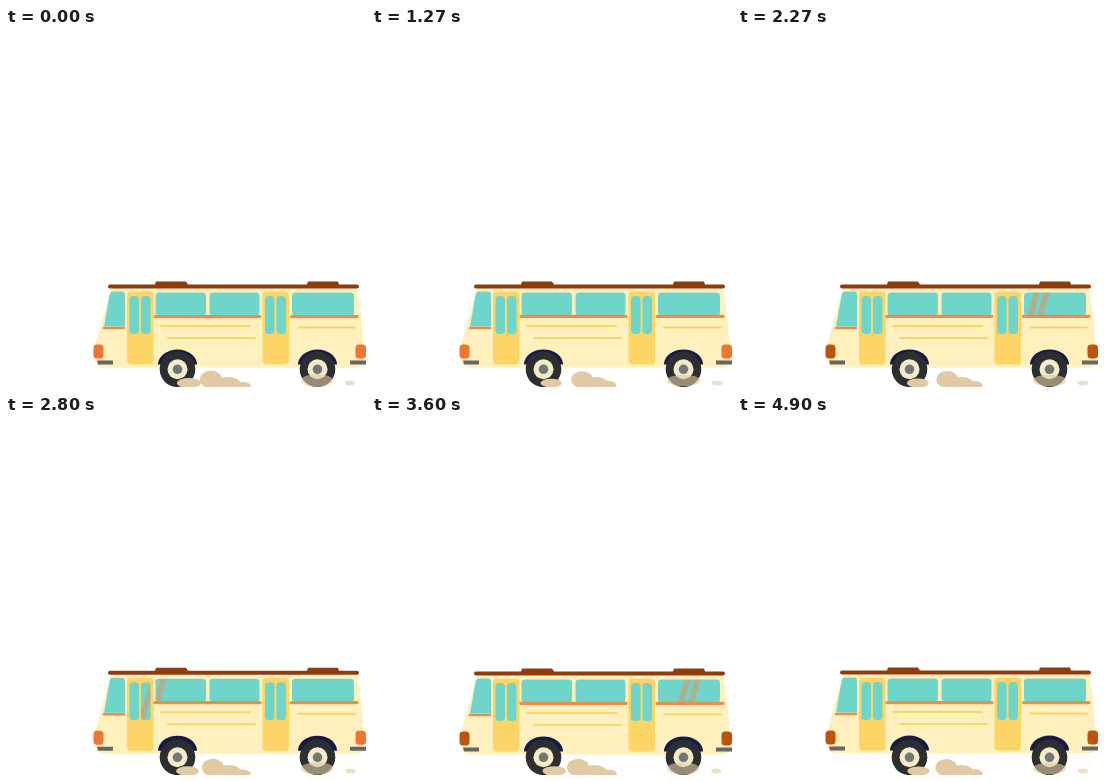
Write an HTML page that moves like this. It is 360x360 px and loops after 5000 ms.

```html
<!DOCTYPE html>
<html lang="en">
<head>
<meta charset="utf-8">
<title>Bus</title>
<style>
  html, body { margin: 0; width: 100%; height: 100%; overflow: hidden; background: #fff; }
  svg { display: block; width: 100vw; height: 100vh; }
</style>
</head>
<body>
<svg viewBox="0 0 360 360">
  <defs>
    <clipPath id="panes"></clipPath>
    <clipPath id="ground"><rect width="360" height="359"/></clipPath>
  </defs>
  <g id="body">
    <path fill="#fff0be" d="M105 259H351Q357 290 358 331Q358 338 350 338H98Q90 338 89 328Q88 318 91 309Z"/>
    <g id="doors" fill="#fdd566"></g>
    <g id="glass" fill="#6dd5ca"></g>
    <g clip-path="url(#panes)">
      <path id="glint" fill="#d59a72" fill-opacity=".65" d="M-4 262h6l-13 44h-6zM6 262h6l-13 44h-6z"/>
    </g>
    <g fill="none" stroke-linecap="round">
      <path stroke="#ef8c48" stroke-width="3.2" d="M149 287H254M285.500 287H351"/>
      <path stroke="#ef8c48" stroke-width="2.500" d="M98 298.500H118"/>
      <path stroke="#fdd566" stroke-width="2" d="M155 296.500H244M162 308.500H249M292 298H349"/>
    </g>
    <path fill="#8f3c08" d="M104 255H149L150 252H180L182 255H301L302 252H332L333 255H351Q353 255 353 257T351 259H104Q102 259 102 257T104 255Z"/>
    <g fill="#171a48">
      <path d="M152 335a19.500 15 0 0 1 39 0z"/>
      <path d="M292 335a19.500 15 0 0 1 39 0z"/>
    </g>
    <path fill="#666664" d="M91 331h16v4H92zM344 331h16v4H344z"/>
    <g id="lamps">
      <rect x="87.500" y="315" width="10" height="14" rx="3.500"/>
      <rect x="349.500" y="315" width="10.500" height="14" rx="3.500"/>
    </g>
  </g>
  <g id="wheels"></g>
  <g id="dust" fill="#e1caa3" clip-path="url(#ground)"></g>
</svg>
<script>
const LOOP = 5000, TAU = Math.PI * 2;
const $ = id => document.getElementById(id);

function add(parent, tag, attrs) {
  const el = document.createElementNS("http://www.w3.org/2000/svg", tag);
  set(el, attrs);
  return parent.appendChild(el);
}
function set(el, attrs) {
  for (const key in attrs) el.setAttribute(key, attrs[key]);
}

function pane(x, y, width, height, rx) {
  for (const layer of [$("glass"), $("panes")]) add(layer, "rect", { x, y, width, height, rx });
}
for (const [x, w] of [[149.5, 50.5], [203.5, 50], [286, 62]]) pane(x, 263, w, 23, 3.5);
for (const x of [121, 256.5]) {
  add($("doors"), "rect", { x, y: 262, width: 26.5, height: 73, rx: 4 });
  pane(x + 2.5, 266.5, 9.5, 38, 4);
  pane(x + 14, 266.5, 9.5, 38, 4);
}
add($("glass"), "path", { d: "M107 262H116Q119 262 119 265V297H98L103.500 266Q104 262 107 262Z" });

for (const cx of [171.5, 311.5]) {
  for (const [r, fill] of [[17.8, "#2c2e2f"], [10, "#f4ecc9"], [4.8, "#707876"]])
    add($("wheels"), "circle", { cx, cy: 341.3, r, fill });
}

// Puffs: x, y, rx, ry, drift in x, change of rx and ry, opacity
const puffs = [
  [183, 355, 12, 5, -6, -2, -1, 1],
  [205, 351.5, 11, 9, 8, 0, -1, 1],
  [222, 355, 12, 6, 4, -2, 0, 1],
  [236, 357.5, 9, 3.5, 0, -1, 2, 1],
  [311, 352.5, 16, 6.5, 1, 1, -1, 0.6],
  [344, 355, 5, 2.5, 2, 1, 0, 0.6]
].map(puff => [add($("dust"), "ellipse", { opacity: puff[7] }), ...puff]);

// Glint sweep: phase, x
const sweep = [[0, 78], [0.24, 149], [0.416, 193], [0.44, 227], [0.64, 256], [0.88, 316], [0.92, 370], [1, 380]];
function along(points, p) {
  const i = Math.max(1, points.findIndex(([q]) => q >= p));
  const [p0, x0] = points[i - 1], [p1, x1] = points[i];
  return x0 + (x1 - x0) * (p - p0) / (p1 - p0);
}

function draw(now) {
  const t = now % LOOP / LOOP;
  const cycle = n => t * n % 1;

  set($("body"), { transform: `translate(0 ${0.6 + Math.cos(TAU * cycle(24))})` });
  set($("lamps"), { fill: cycle(8) < 0.54 ? "#ee762f" : "#c0520f" });
  set($("glint"), { transform: `translate(${along(sweep, cycle(4))} 0)` });

  const s = Math.sin(Math.PI * cycle(7));
  for (const [el, x, cy, rx, ry, dx, dw, dh] of puffs)
    set(el, { cx: x + dx * s, cy, rx: rx + dw * s, ry: ry + dh * s });
}

const start = performance.now();
function tick() {
  draw(performance.now() - start);
  requestAnimationFrame(tick);
}
tick();
</script>
</body>
</html>
```
